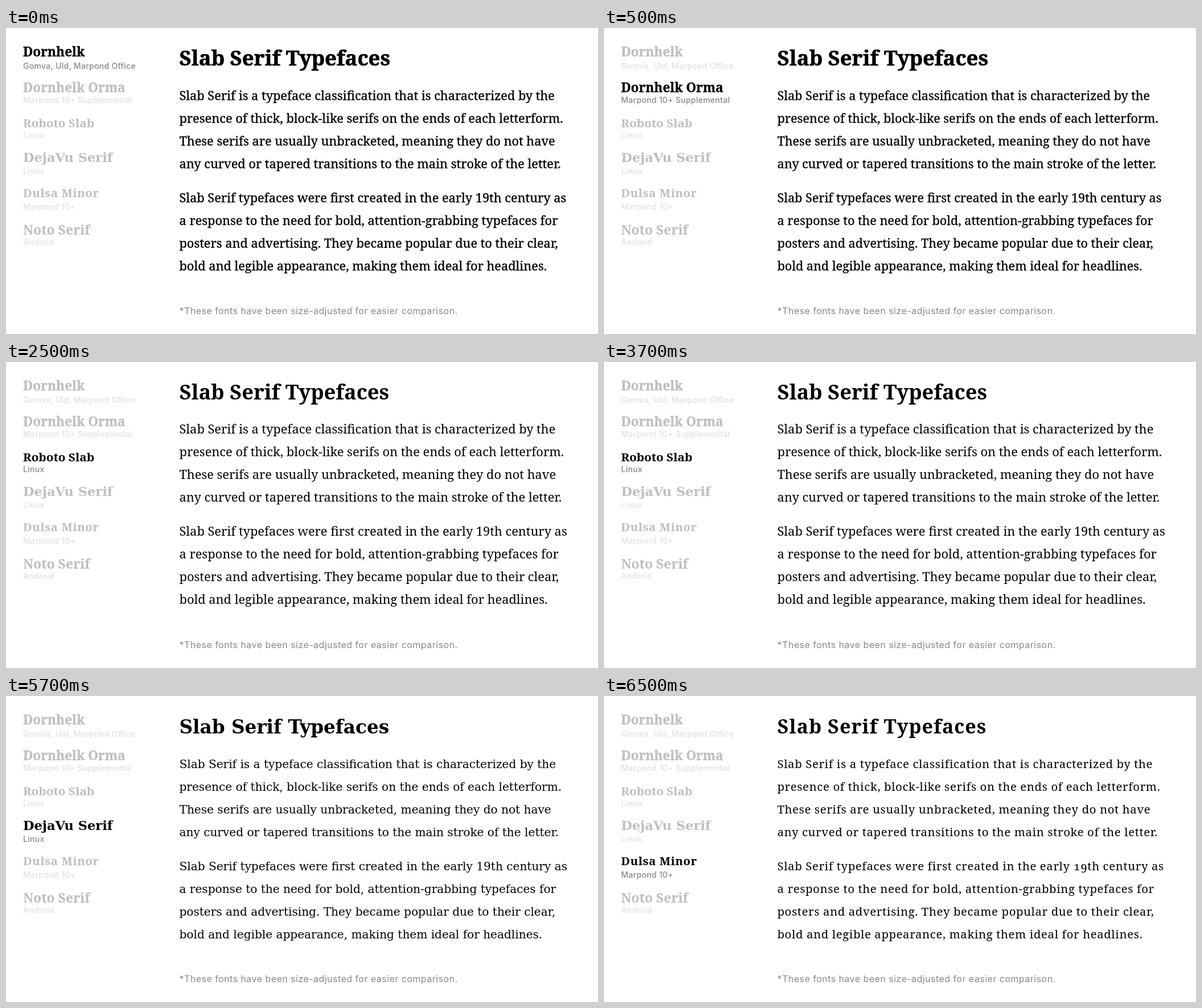
An HTML page that plays this animation: 1040 px wide and 539 px high, repeating every 8 s.

```html
<!DOCTYPE html>
<html lang="en">
<head>
<meta charset="utf-8">
<title>Slab Serif Typefaces</title>
<style>
  html, body { margin: 0; width: 100%; height: 100%; overflow: hidden; background: #fff; }
  svg { display: block; width: 100%; height: 100%; }
  .title, .name { font-weight: 700; }
  .system, .note { font-family: Inter, "Open Sans", sans-serif; fill: #888; }
  .system { font-size: 14px; font-weight: 500; letter-spacing: .3px; }
  .note { font-size: 16px; letter-spacing: .46px; }
</style>
</head>
<body>
<svg id="stage" viewBox="0 0 1040 539"></svg>
<script>
const LOOP = 8000;
const FIRST_SWITCH = 500;
const HOLD = 2000;
const COLUMN_X = 304.5;
const LINE_HEIGHT = 40;

const NOTO = '"Noto Serif", serif';
const DEJAVU = '"DejaVu Serif", "Noto Serif", serif';

// y: name baseline, gap: distance to the system label, top: shift of the sample,
// stroke: extra weight of the body, spacing: letter-spacing in em
const faces = [
  { name: "Dornhelk", system: "Gomva, Uld, Marpond Office", y: 50, gap: 22, size: 22.6,
    family: NOTO, title: 36.4, body: 21.75, stroke: .35 },
  { name: "Dornhelk Orma", system: "Marpond 10+ Supplemental", y: 113, gap: 19, size: 22.6,
    family: NOTO, title: 36.4, body: 21.6, stroke: .3 },
  { name: "Roboto Slab", system: "Linux", y: 175, gap: 19, size: 20.7,
    family: NOTO, title: 36.2, body: 21.8, top: -.5 },
  { name: "DejaVu Serif", system: "Linux", y: 236, gap: 21, size: 22.5,
    family: DEJAVU, title: 32.7, body: 20.1 },
  { name: "Dulsa Minor", system: "Marpond 10+", y: 298, gap: 22, size: 20.3,
    family: NOTO, title: 34, body: 20.3, spacing: .032, numerals: "oldstyle-nums" },
  { name: "Noto Serif", system: "Android", y: 364, gap: 18, size: 23, family: NOTO }
];

const paragraphs = [
  { y: 126.5, lines: [
    "Slab Serif is a typeface classification that is characterized by the",
    "presence of thick, block-like serifs on the ends of each letterform.",
    "These serifs are usually unbracketed, meaning they do not have",
    "any curved or tapered transitions to the main stroke of the letter."] },
  { y: 306.5, lines: [
    "Slab Serif typefaces were first created in the early 19th century as",
    "a response to the need for bold, attention-grabbing typefaces for",
    "posters and advertising. They became popular due to their clear,",
    "bold and legible appearance, making them ideal for headlines."] }
];

const stage = document.getElementById("stage");

function add(parent, tag, style = {}) {
  const node = document.createElementNS("http://www.w3.org/2000/svg", tag);
  Object.assign(node.style, style);
  return parent.appendChild(node);
}

function write(parent, text, x, y, className, style) {
  const node = add(parent, "text", style);
  node.setAttribute("x", x);
  node.setAttribute("y", y);
  node.setAttribute("class", className);
  node.textContent = text;
}

function textStyle(face, size, stroke = 0) {
  return {
    fontFamily: face.family,
    fontSize: size + "px",
    letterSpacing: face.spacing ? face.spacing * size + "px" : "normal",
    fontVariantNumeric: face.numerals || "normal",
    stroke: stroke ? "#000" : "none",
    strokeWidth: stroke
  };
}

function buildEntry(face) {
  const entry = add(stage, "g");
  write(entry, face.name, 30, face.y, "name", textStyle(face, face.size, face.stroke));
  write(entry, face.system, 30, face.y + face.gap, "system");
  return entry;
}

function buildSample(face) {
  const { title, body, stroke = 0, top = 0 } = face;
  const sample = add(stage, "g");
  write(sample, "Slab Serif Typefaces", COLUMN_X, 66 + top, "title",
    textStyle(face, title, stroke * 2));
  for (const { y, lines } of paragraphs) {
    lines.forEach((line, i) =>
      write(sample, line, COLUMN_X, y + i * LINE_HEIGHT + top, "body",
        textStyle(face, body, stroke)));
  }
  return sample;
}

const entries = faces.map(buildEntry);
const samples = faces.filter(face => face.body).map(buildSample);
write(stage, "*These fonts have been size-adjusted for easier comparison.",
  COLUMN_X, 504, "note");

function render(time) {
  const active = Math.floor((time % LOOP - FIRST_SWITCH) / HOLD) + 1;
  entries.forEach((entry, i) => { entry.style.opacity = i === active ? 1 : .25; });
  samples.forEach((sample, i) => {
    sample.style.visibility = i === active ? "visible" : "hidden";
  });
}

const start = performance.now();
function tick() {
  render(performance.now() - start);
  requestAnimationFrame(tick);
}
tick();
</script>
</body>
</html>
```
